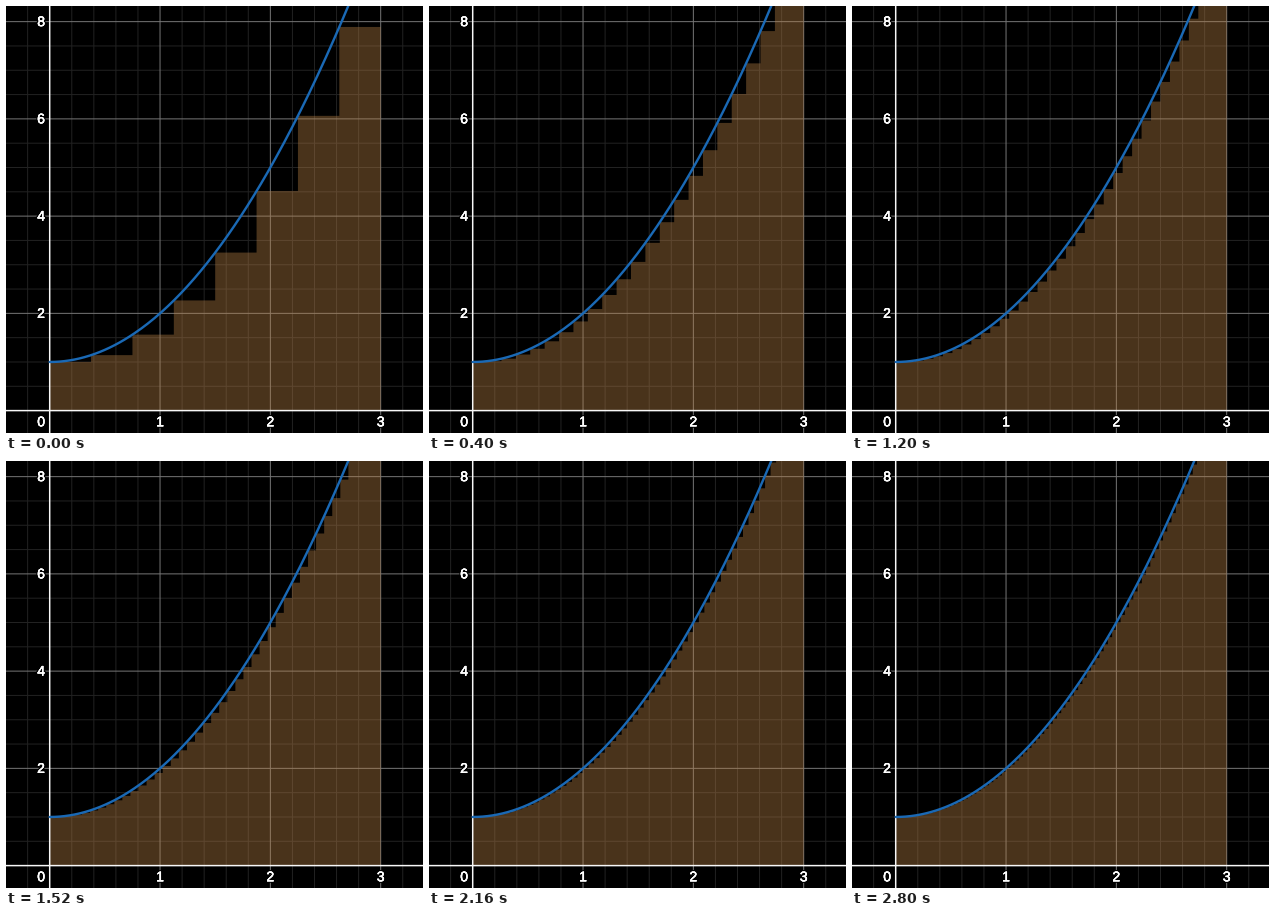
Write a matplotlib script that moves like this. It is 417x427 px and loops after 2880 ms.

```python
import numpy as np
import matplotlib.pyplot as plt
from matplotlib.animation import FuncAnimation
from matplotlib.patches import Polygon
from matplotlib.patheffects import Normal, withStroke

W, H, DPI = 417, 427, 64
PX = 72 / DPI                 # points per pixel
X0, Y0 = 43.7, 404.6          # graph origin on the stage
SX, SY = 110.33, 48.62        # pixels per unit
FRAMES, STEP_MS = 36, 80

MINOR, MAJOR, AXIS = "#222222", "#757575", "#f8f8f8"
FILL, CURVE = (0.72, 0.5, 0.27, 0.4), "#1a69b5"


def to_x(u):
    return X0 + SX * u


def to_y(v):
    return Y0 - SY * v


def f(u):
    return 1 + u * u


def vline(u, color, width, z):
    ax.plot([to_x(u)] * 2, [-2, H + 2], color=color, lw=width * PX,
            zorder=z, snap=False)


def hline(v, color, width, z):
    ax.plot([-2, W + 2], [to_y(v)] * 2, color=color, lw=width * PX,
            zorder=z, snap=False)


def label(x, y, text, ha):
    ax.text(x, y, text, color="white", ha=ha, va="center_baseline", zorder=6,
            family="Liberation Sans", size=14 * PX,
            path_effects=[withStroke(linewidth=3 * PX, foreground="black"),
                          withStroke(linewidth=0.3 * PX, foreground="white"),
                          Normal()])


def staircase(n):
    """Outline of the left Riemann sum of f on [0, 3] with n bars."""
    edges = np.linspace(0, 3, n + 1)
    u = np.repeat(edges, 2)
    v = np.concatenate([[0], np.repeat(f(edges[:-1]), 2), [0]])
    return np.column_stack([to_x(u), to_y(v)])


def bar_count(i):
    return int(round(np.interp(i, [0, 5, 11, 15, 19, 27, 35],
                               [8, 23, 30, 35, 41, 60, 78])))


fig = plt.figure(figsize=(W / DPI, H / DPI), dpi=DPI, facecolor="black")
ax = fig.add_axes([0, 0, 1, 1])
ax.set_xlim(0, W)
ax.set_ylim(H, 0)
ax.axis("off")

for k in range(-1, 17):
    if k % 5:
        vline(k / 5, MINOR, 1, 1)
    if k % 4:
        hline(k / 2, MINOR, 1, 1)
for k in (1, 2, 3):
    vline(k, MAJOR, 1, 2)
for k in (2, 4, 6, 8):
    hline(k, MAJOR, 1, 2)

bars = Polygon(staircase(8), closed=True, facecolor=FILL, edgecolor="none",
               lw=0, zorder=3, snap=False)
ax.add_patch(bars)

vline(0, AXIS, 1.5, 4)
hline(0, AXIS, 1.5, 4)

u = np.linspace(0, 3, 200)
ax.plot(to_x(u), to_y(f(u)), color=CURVE, lw=2.4 * PX, zorder=5,
        solid_capstyle="round")

for k in (2, 4, 6, 8):
    label(39, to_y(k) - 1, str(k), "right")
for k in (1, 2, 3):
    label(to_x(k), 414.8, str(k), "center")
label(39, 414.8, "0", "right")


def update(i):
    bars.set_xy(staircase(bar_count(i)))
    return (bars,)


anim = FuncAnimation(fig, update, frames=FRAMES, interval=STEP_MS,
                     repeat=True, repeat_delay=0, blit=False)
plt.show()
```
